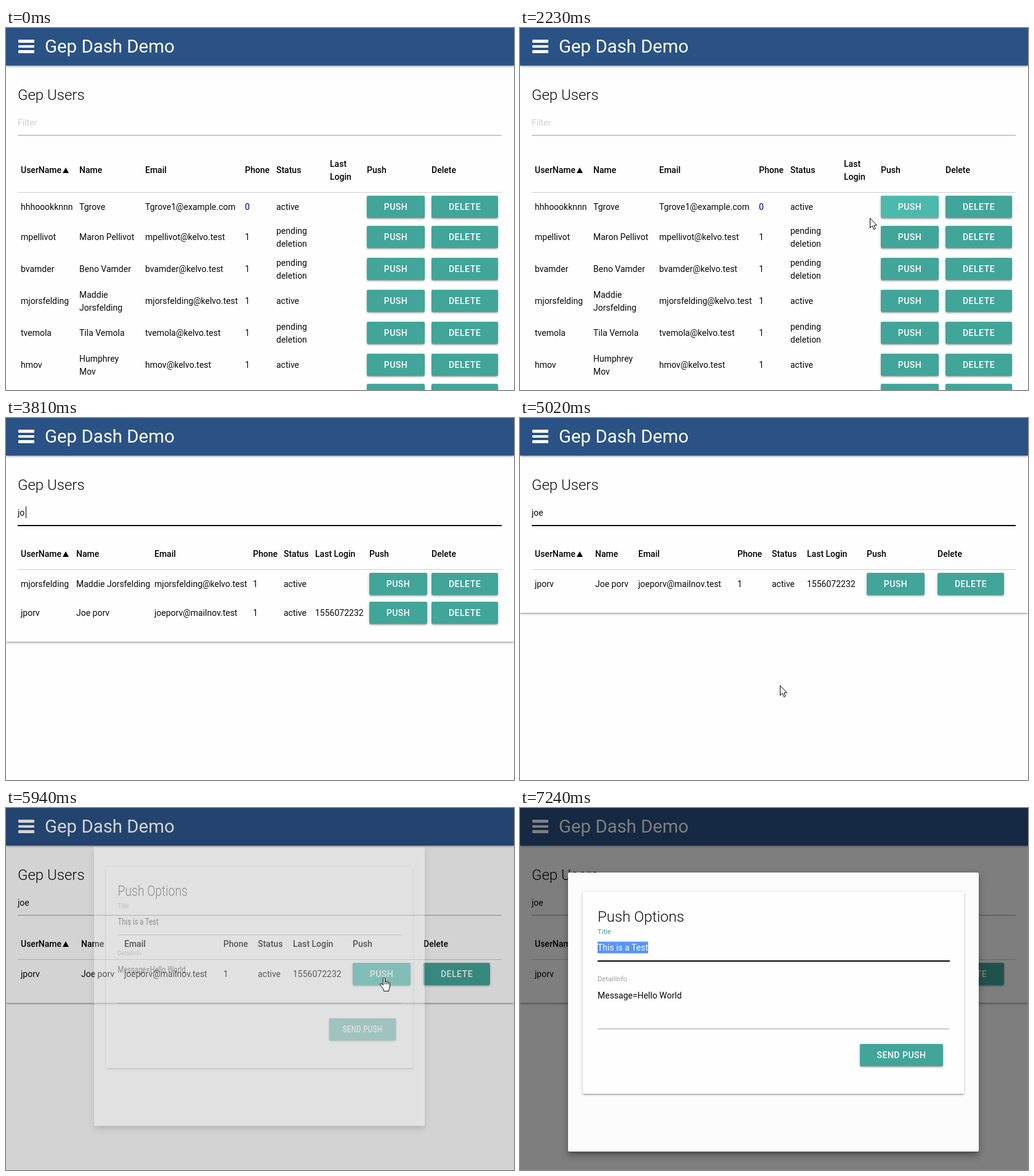
Recreate the animation shown at these times as an HTML page. Size 825 by 589 pixels, loop 8000 ms.

```html
<!DOCTYPE html>
<html lang="en">
<head>
<meta charset="utf-8">
<title>Dash Demo</title>
<style>
html, body { margin: 0; width: 825px; height: 589px; overflow: hidden; background: #fefefe; }
body { position: relative; font: 14px/21px Roboto, sans-serif; color: #0a0a0a; }
div, svg { position: absolute; }
.text { white-space: pre; }
.head { font-weight: 500; color: #000; }
.title { font-size: 24px; font-weight: 300; }
.label { font-size: 11.2px; color: #9e9e9e; }
.link { color: #00007a; }
.card, .bar, .btn {
  box-shadow: 0 2px 2px rgba(0,0,0,.14), 0 3px 1px -2px rgba(0,0,0,.12), 0 1px 5px rgba(0,0,0,.2);
}
.card { background: #fefefe; }
.panel { left: -6px; right: -6px; top: 62px; }
.bar { left: 0; top: 0; width: 825px; height: 61px; background: #2a5285; }
.brand { font-size: 29.4px; color: #fff; }
.burger { left: 20px; width: 25.5px; height: 4.4px; border-radius: 1px; background: #fff; }
.btn {
  height: 36px; line-height: 36px; border-radius: 2px; background: #41a599; color: #fff;
  text-align: center; letter-spacing: .5px; font-weight: 500;
}
.rule { height: 1px; background: #cdcdcd; }
.field { height: 1px; background: #9e9e9e; }
.field.on { background: #000; box-shadow: 0 1px #000; }
.sort { width: 10px; height: 9px; background: #000; clip-path: polygon(50% 0, 100% 100%, 0 100%); }
#caret { top: 144px; width: 1px; height: 19px; background: #000; }
#shade { inset: 0; background: #000; }
#modal {
  left: 78px; top: 105px; width: 667px; height: 454px; border-radius: 2px; background: #fcfcfc;
  box-shadow: 0 8px 10px 1px rgba(0,0,0,.14), 0 3px 14px 2px rgba(0,0,0,.12), 0 5px 5px -3px rgba(0,0,0,.3);
}
#modal .card { left: 24px; top: 32px; width: 619px; height: 328px; border-radius: 2px; }
#modal .label.on { color: #35a597; }
.picked { background: #5893f8; color: #fff; }
#cursor { left: 0; top: 0; overflow: visible; }
#cursor path { fill: #fff; stroke: #000; stroke-linejoin: round; }
</style>
</head>
<body>
<script>
const LOOP = 8000;

function box(parent, cls, style = {}, content = '') {
  const el = document.createElement('div');
  el.className = cls;
  el.textContent = content;
  for (const k in style) el.style[k] = typeof style[k] === 'number' ? style[k] + 'px' : style[k];
  return parent.appendChild(el);
}

// y is the middle of the text row
function text(parent, x, y, s, cls = '') {
  const extra = s.split('\n').length - 1;
  return box(parent, 'text ' + cls, { left: x, top: y - 10.5 - extra * 10 }, s);
}

const buttons = [];
function button(parent, x, y, width, label, view) {
  const el = box(parent, 'btn', { left: x, top: y, width }, label);
  if (view) buttons.push({ el, x, y, width, view });
}

function table({ name, cols, headY, lineY, bottom, login, rows }) {
  const view = box(document.body, 'view');
  view.style.width = '825px';
  box(view, 'card panel', { height: bottom - 62, left: 0, width: 825 });
  ['UserName', 'Name', 'Email', 'Phone', 'Status', login, 'Push', 'Delete']
    .forEach((s, i) => text(view, cols[i], headY, s, 'head'));
  box(view, 'sort', { left: 92, top: headY - 4 });
  box(view, 'rule', { left: 19, top: lineY, width: 786 });
  for (const [y, ...cells] of rows) {
    cells.forEach((s, i) => text(view, cols[i], y, s, i === 3 && name === 'all' ? 'link' : ''));
    button(view, cols[6], y - 18, 94, 'PUSH', name);
    button(view, cols[7], y - 18, 108, 'DELETE', name);
  }
  return view;
}

const pending = 'pending\ndeletion';
const joe = ['jporv', 'Joe porv', 'joeporv@mailnov.test', '1', 'active', '1556072232'];
const views = {
  all: table({
    name: 'all', cols: [24, 119, 226, 388, 439, 526, 586, 691],
    headY: 231, lineY: 267, bottom: 640, login: 'Last\nLogin',
    rows: [
      [291, 'hhhoookknnn', 'Tgrove', 'Tgrove1@example.com', '0', 'active'],
      [340, 'mpellivot', 'Maron Pellivot', 'mpellivot@kelvo.test', '1', pending],
      [392, 'bvamder', 'Beno Vamder', 'bvamder@kelvo.test', '1', pending],
      [444, 'mjorsfelding', 'Maddie\nJorsfelding', 'mjorsfelding@kelvo.test', '1', 'active'],
      [496, 'tvemola', 'Tila Vemola', 'tvemola@kelvo.test', '1', pending],
      [548, 'hmov', 'Humphrey\nMov', 'hmov@kelvo.test', '1', 'active'],
      [597]
    ]
  }),
  two: table({
    name: 'two', cols: [24, 114, 241, 401, 451, 502, 590, 691],
    headY: 221, lineY: 246, bottom: 364, login: 'Last Login',
    rows: [
      [270, 'mjorsfelding', 'Maddie Jorsfelding', 'mjorsfelding@kelvo.test', '1', 'active'],
      [317, ...joe]
    ]
  }),
  one: table({
    name: 'one', cols: [24, 122, 192, 353, 409, 466, 563, 678],
    headY: 221, lineY: 246, bottom: 317, login: 'Last Login',
    rows: [[270, ...joe]]
  })
};

const page = document.body;
text(page, 19, 109, 'Gep Users', 'title');
const filter = text(page, 19, 154, '');
const filterLine = box(page, 'field', { left: 19, top: 174, width: 786 });
const caret = box(page, '');
caret.id = 'caret';

const bar = box(page, 'bar');
[19.4, 27.9, 36.3].forEach(top => box(bar, 'burger', { top }));
text(bar, 63, 30, 'Gep Dash Demo', 'brand');

const shade = box(page, '');
shade.id = 'shade';
const modal = box(page, '');
modal.id = 'modal';
box(modal, 'card');
text(modal, 48, 72, 'Push Options', 'title');
const titleLabel = text(modal, 48, 96, 'Title', 'label');
text(modal, 48, 122, 'This is a Test');
const picked = text(modal, 48, 122, 'This is a Test', 'picked');
const titleLine = box(modal, 'field', { left: 48, top: 143, width: 572 });
text(modal, 48, 173, 'DetailInfo', 'label');
text(modal, 48, 200, 'Message=Hello World');
box(modal, 'field', { left: 48, top: 254, width: 571 });
button(modal, 474, 279, 135, 'SEND PUSH');

page.insertAdjacentHTML('beforeend', `<svg id="cursor" width="20" height="26">
  <path data-kind="arrow" d="M.5 .5V16.3L4.2 12.9 6.7 18.7 9.2 17.7 6.8 12H11.5Z"/>
  <path data-kind="hand" d="M-1.5 13V2C-1.5 0 1.5 0 1.5 2V8C1.7 6.6 4.3 6.8 4.3 8.4 4.8 7.4 7 7.6 7 9.2 7.6 8.4 9.4 8.8 9.4 10.4V15C9.4 18 7.6 19 7.6 23H-.4C-.6 19.8-2.8 17.4-4.4 15.2-5.8 13.2-6.6 12-6 11.2-5 10-2.8 11.4-1.5 13.2ZM1.5 8V12M4.3 8.4V12M7 9.2V12"/>
  <path data-kind="beam" style="fill:none" d="M-3-8.5H-1L0-7.5 1-8.5H3M0-7.5V7.5M-3 8.5H-1L0 7.5 1 8.5H3"/>
</svg>`);
const cursor = document.getElementById('cursor');
const shapes = [...cursor.children];

// [time, x, y] of the pointer's hot spot; two visible stretches
const paths = [
  [[210, 775, 561], [570, 632, 385], [720, 632, 385], [1490, 622, 286], [2190, 622, 286],
   [2230, 569, 309], [2280, 520, 311], [2700, 90, 152], [3020, 86, 152], [3250, 103, 409], [3810, 103, 409]],
  [[4840, 103, 409], [4930, 260, 478], [5020, 421, 435], [5300, 565, 335], [5530, 614, 275],
   [6450, 614, 275], [6550, 449, 283], [6600, 399, 277], [6650, 360, 258], [6730, 290, 225],
   [6850, 216, 227], [7200, 22, 190], [LOOP, 22, 190]]
];

function pointer(t) {
  const path = paths.find(p => t >= p[0][0] && t < p.at(-1)[0]);
  if (!path) return null;
  const i = path.findIndex(k => k[0] > t);
  const [t0, x0, y0] = path[i - 1], [t1, x1, y1] = path[i];
  const k = (t - t0) / (t1 - t0);
  return { x: x0 + (x1 - x0) * k, y: y0 + (y1 - y0) * k };
}

const viewAt = t => t < 3810 ? 'all' : t < 4140 ? 'two' : 'one';
const within = (t, a, b) => t >= a && t < b;
const show = (el, on) => { el.style.display = on ? '' : 'none'; };

function hit(b, t) {
  const p = pointer(t);
  return p && b.view === viewAt(t) && within(p.x, b.x, b.x + b.width) && within(p.y, b.y, b.y + 36);
}

function cursorKind(t, p) {
  if (t < 6451 && buttons.some(b => hit(b, t))) return 'hand';
  if (t < 5000) return within(p.y, 138, 176) ? 'beam' : 'arrow';
  return t > 6700 ? 'beam' : 'arrow';
}

function drawFilter(t) {
  const typed = t < 3630 ? '' : t < 3810 ? 'j' : t < 4140 ? 'jo' : 'joe';
  filter.textContent = typed || 'Filter';
  filter.style.color = typed ? '' : '#d0d0d0';
  filterLine.classList.toggle('on', within(t, 2700, 5710));
  show(caret, within(t, 2700, 3220) || within(t, 3630, 4690) || within(t, 5190, 5700));
  caret.style.left = [19, 23, 32, 41][typed.length] + 'px';
}

// hover colour fades over 200 ms
function drawButtons(t) {
  for (const b of buttons) {
    let lit = 0;
    for (let i = 0; i < 10; i++) if (hit(b, t - i * 20)) lit += .1;
    const mix = (a, z) => Math.round(a + (z - a) * lit);
    b.el.style.background = `rgb(${mix(65, 77)},${mix(165, 187)},${mix(153, 174)})`;
  }
}

function drawModal(t, p) {
  const k = Math.min(1, Math.max(0, (t - 5902) / 208));
  const fade = 1 - (1 - k) ** 2;
  const grow = k < .5 ? 4 * k ** 3 : 1 - 4 * (1 - k) ** 3;
  shade.style.opacity = fade * .5;
  modal.style.opacity = fade;
  show(modal, k > 0);
  modal.style.transform = `translateY(${43 * (grow - 1)}px) scaleX(${.8 + .2 * grow})`;
  const focus = t >= 6850;
  titleLabel.classList.toggle('on', focus);
  titleLine.classList.toggle('on', focus);
  show(picked, focus);
  if (focus) {
    const cut = Math.max(0, Math.round((p.x - 126) / 6) * 6);
    picked.style.clipPath = `inset(1px 0 1px ${cut}px)`;
  }
}

function drawCursor(t, p) {
  const visible = p && !(t > 6700 && p.x < 78);
  show(cursor, visible);
  if (!visible) return;
  const kind = cursorKind(t, p);
  shapes.forEach(s => show(s, s.dataset.kind === kind));
  cursor.style.transform = `translate(${Math.round(p.x)}px,${Math.round(p.y)}px)`;
}

function render(t) {
  const p = pointer(t);
  for (const name in views) show(views[name], name === viewAt(t));
  drawFilter(t);
  drawButtons(t);
  drawModal(t, p);
  drawCursor(t, p);
}

const start = performance.now();
function tick() {
  render((performance.now() - start) % LOOP);
  requestAnimationFrame(tick);
}
tick();
</script>
</body>
</html>
```
